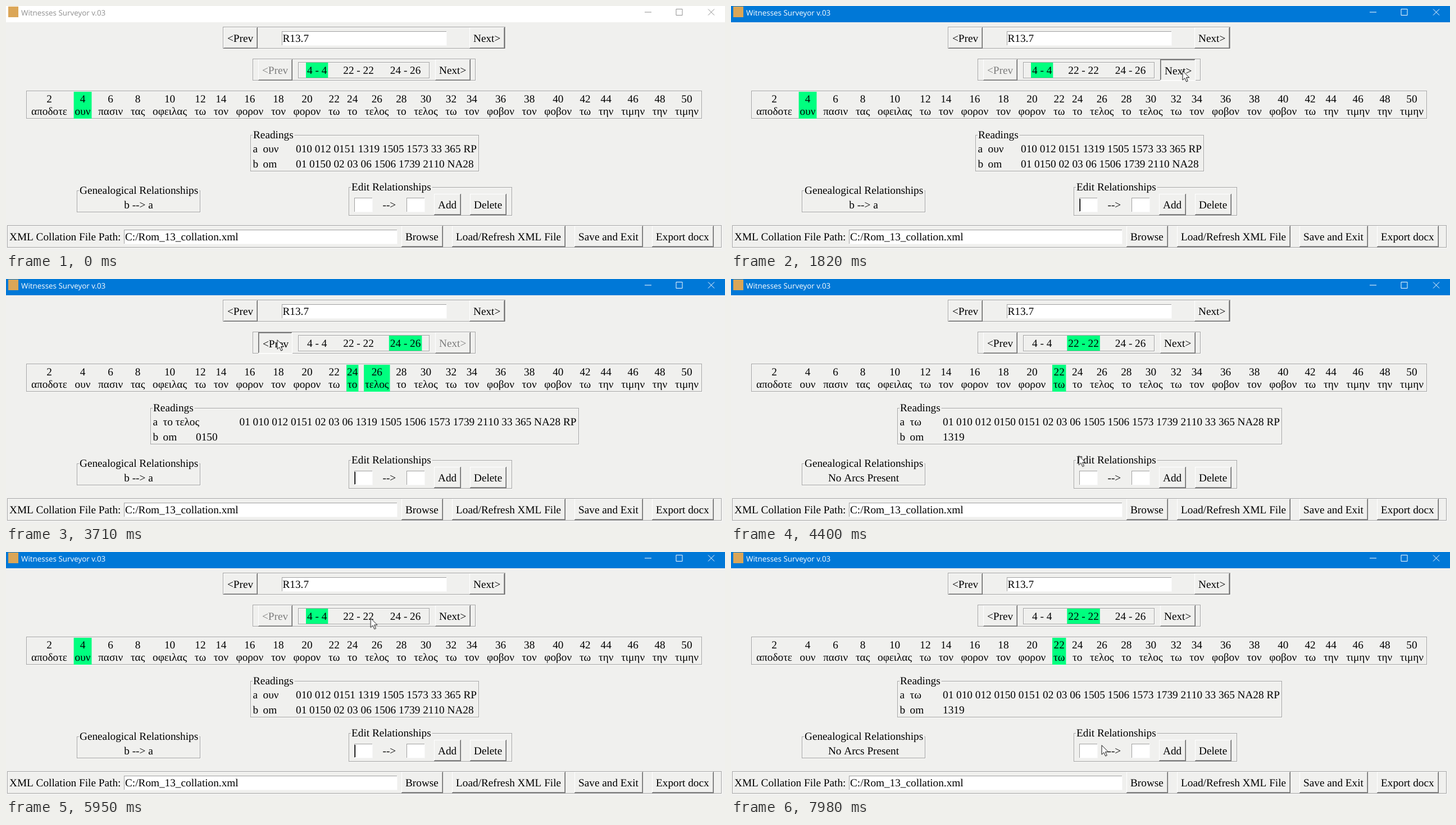
These frames come from a looping animation (1280 px wide and 437 px high, 8 s). An HTML page:

```html
<!DOCTYPE html>
<html lang="en">
<head>
<meta charset="utf-8">
<title>Witnesses Surveyor</title>
<style>
html, body { margin: 0; width: 100%; height: 100%; overflow: hidden; background: #f0f0ee; }
svg { display: block; width: 1280px; height: 437px; }
text {
  font: 19.25px "Liberation Serif", "Times New Roman", serif;
  font-kerning: none; font-variant-ligatures: none;
  text-rendering: geometricPrecision; white-space: pre; fill: #000;
}
.mid { text-anchor: middle; }
.off { fill: #7c7c7c; }
.title { font: 13.4px "Open Sans", "Noto Sans", sans-serif; fill: var(--ink); }
.ctl { fill: none; stroke: var(--ink); }
.idle { --ink: #8f8f8f; }
.live { --ink: #fff; }
</style>
</head>
<body>
<svg id="stage" viewBox="0 0 1280 437" xmlns="http://www.w3.org/2000/svg"></svg>
<script>
const LOOP = 8000, BG = '#f0f0ee', GREEN = '#00ff7f';
const PREV = '<Prev', NEXT = 'Next>';
const stage = document.getElementById('stage');
let parent = stage;

function add(tag, attrs, content) {
  const el = document.createElementNS('http://www.w3.org/2000/svg', tag);
  for (const key in attrs) el.setAttribute(key, attrs[key]);
  if (content) el.textContent = content;
  return parent.appendChild(el);
}
function group(draw, attrs) {
  const outer = parent, g = add('g', attrs);
  parent = g;
  draw();
  parent = outer;
  return g;
}
const rect = (x, y, width, height, fill) => add('rect', { x, y, width, height, fill });
const text = (x, y, s, cls = '') => add('text', { x, y, class: cls }, s);
const mid = (x, y, s, cls = '') => text(x, y, s, 'mid ' + cls);

const ruler = document.createElement('canvas').getContext('2d');
ruler.font = '19.25px "Liberation Serif", "Times New Roman", serif';
ruler.fontKerning = 'none';
const measure = s => ruler.measureText(s).width;

// One-pixel edges: top and left in one colour, bottom and right in the other.
function edges(x, y, w, h, lit, dark) {
  rect(x, y, w, 1, lit);
  rect(x, y, 1, h, lit);
  rect(x, y + h - 1, w, 1, dark);
  rect(x + w - 1, y, 1, h, dark);
}
function frame(x, y, w, h, legend) {
  edges(x + 1, y + 1, w, h, '#f9f9f8', '#f9f9f8');
  edges(x, y, w, h, '#a3a3a3', '#a3a3a3');
  if (!legend) return;
  rect(x + 4, y - 9, measure(legend) + 3, 18, BG);
  text(x + 5, y + 6, legend);
}
function entry(x, y, w) {
  rect(x, y, w, 26, '#fff');
  edges(x, y, w, 26, '#a0a0a0', '#f6f6f6');
}
// Draws a button as wide as its label needs and returns its right end.
function button(x, y, label, { sunken = false, cls = '' } = {}) {
  const w = Math.round(measure(label) + 15), h = 38, d = sunken ? 1 : 0;
  rect(x, y, w, h, BG);
  edges(x + 1, y + 1, w - 2, h - 2, sunken ? '#a0a0a0' : BG, sunken ? BG : '#a0a0a0');
  edges(x, y, w, h, sunken ? '#696969' : '#fff', sunken ? '#fff' : '#696969');
  text(x + 7 + d, y + 26 + d, label, cls);
  return x + w;
}
// Lays labels side by side; each cell has 2px of padding.
function cells(x, gap, labels) {
  return labels.map(s => {
    const cell = { s, x, w: measure(s) + 4 };
    x += cell.w + gap;
    return cell;
  });
}

// Shows an element only during the given [start, end] spans.
function during(el, spans) {
  const keys = [{ offset: 0, opacity: spans[0][0] ? 0 : 1 }];
  for (const [from, to] of spans) {
    if (from) keys.push({ offset: from / LOOP, opacity: 1 });
    if (to < LOOP) keys.push({ offset: to / LOOP, opacity: 0 });
  }
  keys.push({ offset: 1, opacity: keys[keys.length - 1].opacity });
  for (const k of keys) k.easing = 'steps(1, end)';
  el.animate(keys, { duration: LOOP, iterations: Infinity });
}

// Every click steps one unit forwards or back on release.
const PRESS = 70;
const clicks = [[1820, NEXT], [2540, NEXT], [3711, PREV], [5630, PREV], [7180, NEXT]];
const focus = clicks[0][0];

function titleBar(fill, cls) {
  return group(() => {
    rect(0, 0, 1280, 29, fill);
    rect(4, 1, 18, 19, '#dba657');
    text(27, 16.5, 'Witnesses Surveyor v.03', 'title');
    add('path', { class: 'ctl', d: 'M1137 11h12M1193 5.5h11v11h-11zM1250 5.5l11 11M1261 5.5l-11 11' });
  }, { class: cls });
}

rect(0, 0, 1280, 437, BG);
titleBar('#fff', 'idle');
during(titleBar('#0078d7', 'live'), [[focus, LOOP]]);

// Verse and unit rows
frame(386, 37, 503, 39);
button(387, 38, PREV);
entry(491, 45, 294);
text(492.5, 64, 'R13.7');
button(825, 38, NEXT);
frame(439, 94, 397, 39);
frame(520, 100, 234, 29);
frame(36, 151, 1203, 50);

// Relationship panels
frame(126, 329, 220, 39, 'Genealogical Relationships');
frame(610, 323, 291, 51, 'Edit Relationships');
entry(620, 342, 33);
text(670.5, 361, '-->');
entry(713, 342, 33);
button(button(762, 335, 'Add') + 16, 335, 'Delete');

// File row
frame(2, 391, 1272, 40);
text(6, 418, 'XML Collation File Path:');
entry(210, 399, 487);
text(212, 418, 'C:/Rom_13_collation.xml');
let right = 688;
for (const label of ['Browse', 'Load/Refresh XML File', 'Save and Exit', 'Export docx']) {
  right = button(right + 16, 392, label);
}

const units = cells(534, 25, ['4 - 4', '22 - 22', '24 - 26']);
const words = ('αποδοτε ουν πασιν τας οφειλας τω τον φορον τον φορον τω το τελος το τελος ' +
  'τω τον φοβον τον φοβον τω την τιμην την τιμην').split(' ');
const used = words.reduce((sum, s) => sum + measure(s) + 4, 0);
const verse = cells(43, (1192 - used) / (words.length - 1), words);

const states = [
  {
    picked: [1], arcs: 'b --> a',
    a: '010 012 0151 1319 1505 1573 33 365 RP',
    b: '01 0150 02 03 06 1506 1739 2110 NA28'
  },
  {
    picked: [10], arcs: 'No Arcs Present',
    a: '01 010 012 0150 0151 02 03 06 1505 1506 1573 1739 2110 33 365 NA28 RP',
    b: '1319'
  },
  {
    picked: [11, 12], arcs: 'b --> a',
    a: '01 010 012 0151 02 03 06 1319 1505 1506 1573 1739 2110 33 365 NA28 RP',
    b: '0150'
  }
];
const spans = states.map(() => []);
let unit = 0, since = 0;
for (const [t, label] of clicks) {
  spans[unit].push([since, t + PRESS]);
  unit += label === NEXT ? 1 : -1;
  since = t + PRESS;
}
spans[unit].push([since, LOOP]);

function reading(x, y, letter, word, witnesses) {
  text(x, y, letter);
  text(x + 18, y, word);
  text(x + 18 + wordWidth(word), y, witnesses);
}
const wordWidth = word => Math.max(58.5, word.length * 17);

states.forEach((s, i) => {
  during(group(() => {
    rect(units[i].x, 101, units[i].w, 27, GREEN);
    for (const k of s.picked) rect(verse[k].x, 153, verse[k].w, 48, GREEN);
    button(449, 95, PREV, { cls: i === 0 ? 'off' : '' });
    button(764, 95, NEXT, { cls: i === 2 ? 'off' : '' });
    const word = s.picked.map(k => words[k]).join(' ');
    const w = Math.round(27 + wordWidth(word) + measure(s.a));
    const x = Math.round(638 - w / 2);
    frame(x, 230, w, 65, 'Readings');
    reading(x + 4.5, 261, 'a', word, s.a);
    reading(x + 4.5, 288, 'b', 'om', s.b);
    mid(236, 361, s.arcs);
  }), spans[i]);
});

for (const c of units) text(c.x + 2, 121, c.s);
verse.forEach((c, i) => {
  mid(c.x + c.w / 2, 172, 2 * i + 2);
  text(c.x + 2, 194, c.s);
});

for (const [label, x] of [[PREV, 449], [NEXT, 764]]) {
  const pressed = clicks.filter(c => c[1] === label).map(([t]) => [t, t + PRESS]);
  during(group(() => button(x, 95, label, { sunken: true })), pressed);
}

// Caret: 600 ms on, 300 ms off
const blinks = [[focus, 2370]];
for (let t = 2670; t < LOOP; t += 900) blinks.push([t, t + 600]);
during(rect(620.5, 344, 1.6, 22, '#000'), blinks);

// Pointer moves (start, end, x, y), each slowing down as it arrives
const moves = [
  [210, 670, 827, 168], [820, 1050, 812, 116], [1220, 1300, 804, 115],
  [2610, 2680, 798, 116], [2780, 3480, 483, 108], [3940, 4700, 640, 346],
  [5080, 5460, 494, 118], [5700, 6640, 792, 117], [7250, 7650, 672, 293],
  [7790, 7980, 660, 344]
];
const TICK = 77;
let px = 1066, py = 474;
const path = [];
const pose = (t, x, y) => path.push({
  offset: t / LOOP, transform: `translate(${x}px, ${y}px)`, easing: 'steps(1, end)'
});
pose(0, px, py);
for (const [from, to, x, y] of moves) {
  const n = Math.round((to - from) / TICK);
  for (let k = 0; k <= n; k++) {
    const left = (1 - (k + 1) / (n + 1)) ** 2;
    pose(from + (to - from) * k / n, x + (px - x) * left, y + (py - y) * left);
  }
  px = x;
  py = y;
}
pose(LOOP, px, py);
const pointer = group(() => add('path', {
  d: 'M0 .7V17.2L3.8 13.6L6.7 20L9.3 18.8L6.5 12.6H11.8z',
  fill: '#fff', stroke: '#111'
}));
pointer.animate(path, { duration: LOOP, iterations: Infinity });
</script>
</body>
</html>
```
